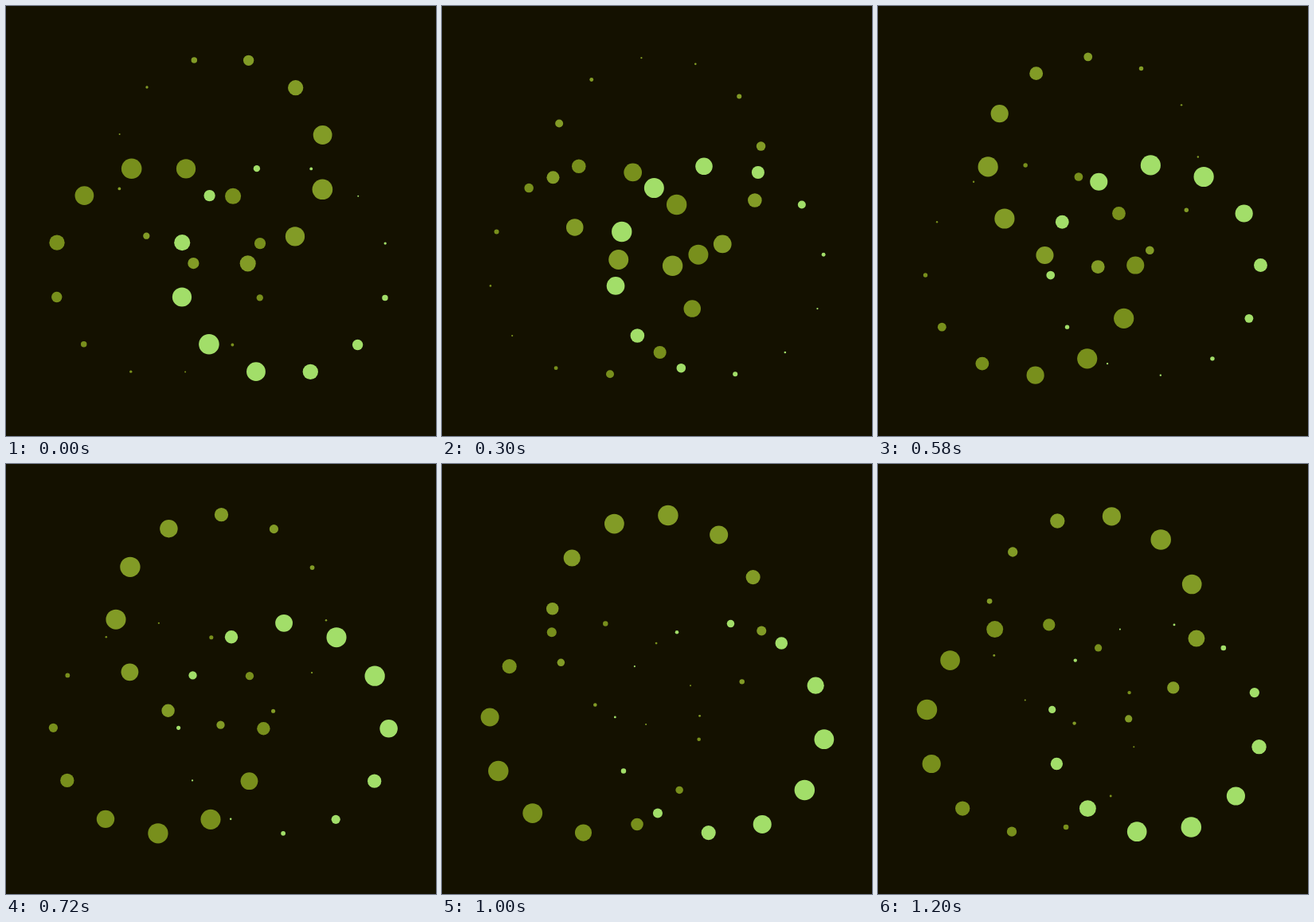
An HTML page with a canvas that plays this animation: 540x540 px, repeating every 1.22 s.

```html
<!DOCTYPE html>
<html lang="en">
<head>
<meta charset="utf-8">
<title>Three rings</title>
<style>
  html, body { margin: 0; width: 100%; height: 100%; overflow: hidden; background: #141100; }
  canvas { display: block; width: 540px; height: 540px; }
</style>
</head>
<body>
<canvas id="stage" width="540" height="540"></canvas>
<script>
const ctx = document.getElementById('stage').getContext('2d');
const TAU = Math.PI * 2;
const LOOP = 1220;    // the loop cuts off before a full pulse has passed
const PULSE = 1440;   // ms for the swell to travel once around the stage
const STEP = 20;
const DOTS = 12;
const RADIUS = 132;

// peak: where the swell starts, in turns clockwise from the top
const rings = [
  { x: 270,   y: 195.7, color: '#829b26', peak: 3.5 / 12 },
  { x: 348.6, y: 331.8, color: '#a2de69', peak: 7.5 / 12 },
  { x: 191.4, y: 331.8, color: '#788f1c', peak: 11.5 / 12 }
];

// Each pulse turns the ring by one dot, while the swell makes a full turn.
function drawRing(ring, progress) {
  ctx.fillStyle = ring.color;
  for (let i = 0; i < DOTS; i++) {
    const angle = TAU * (i + 0.5 + progress) / DOTS;
    const size = 6.9 + 5.9 * Math.cos(angle - TAU * (ring.peak + progress));
    ctx.beginPath();
    ctx.arc(ring.x + RADIUS * Math.sin(angle), ring.y - RADIUS * Math.cos(angle), size, 0, TAU);
    ctx.fill();
  }
}

function draw(ms) {
  const time = Math.floor((ms % LOOP) / STEP) * STEP + STEP / 2;
  ctx.fillStyle = '#141100';
  ctx.fillRect(0, 0, 540, 540);
  for (const ring of rings) drawRing(ring, time / PULSE);
}

let start;
function tick(now) {
  start ??= now;
  draw(Math.max(0, now - start));
  requestAnimationFrame(tick);
}
draw(0);
requestAnimationFrame(tick);
</script>
</body>
</html>
```
